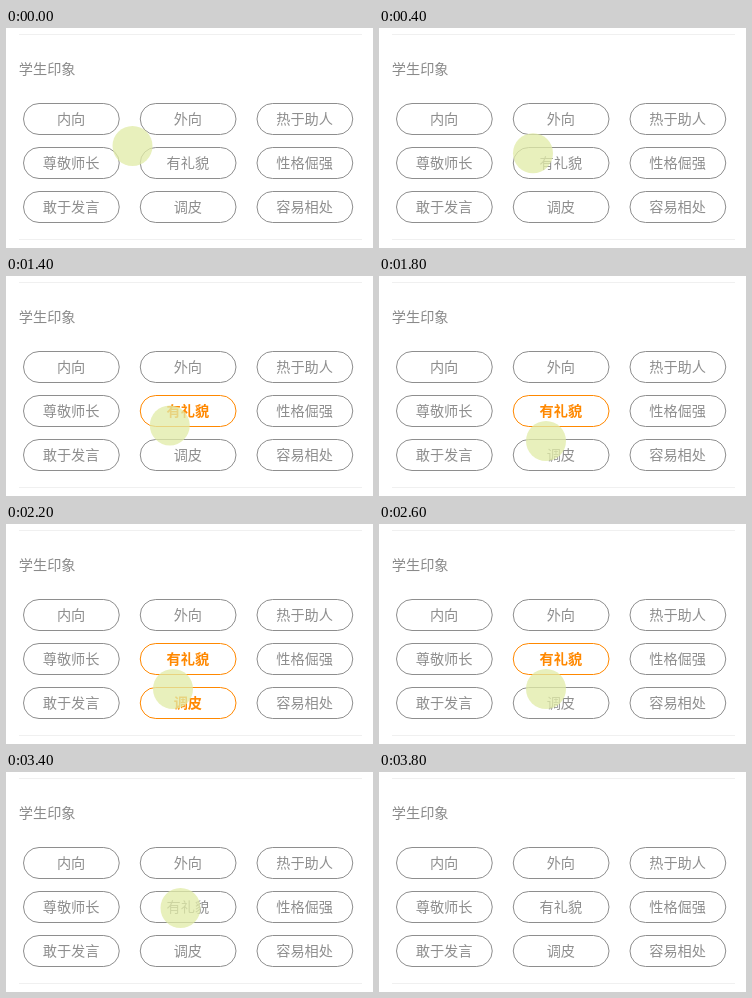
Animation, 367 px wide and 220 px high, one loop 4800 ms. Source, as an HTML page with a canvas:

```html
<!DOCTYPE html>
<html lang="zh-CN">
<head>
<meta charset="utf-8">
<title>学生印象</title>
<style>
html, body { margin: 0; width: 100%; height: 100%; overflow: hidden; background: #fff; }
canvas { display: block; width: 367px; height: 220px; }
</style>
</head>
<body>
<canvas id="stage"></canvas>
<script>
const W = 367, H = 220, LOOP = 4800, STEP = 200;
const canvas = document.getElementById('stage');
const ctx = canvas.getContext('2d');
const ratio = window.devicePixelRatio || 1;
canvas.width = W * ratio;
canvas.height = H * ratio;
ctx.scale(ratio, ratio);

const FONT = '"Noto Sans CJK SC", "Noto Sans CJK", sans-serif';
const GREY = '#8e8e8e', ORANGE = '#ff8800';
const TAGS = [
  '内向', '外向', '热于助人',
  '尊敬师长', '有礼貌', '性格倔强',
  '敢于发言', '调皮', '容易相处'
];
const GRID = { x: 17, y: 75, dx: 116.75, dy: 44, w: 96.75, h: 32 };

const linear = p => p;
const easeOut = p => 1 - (1 - p) ** 3;

const HOME = { x: 126.5, y: 118 };
const MOVES = [
  { from: 0, to: 200, x: 119, y: 120, ease: linear },
  { from: 200, to: 600, x: 159, y: 126, ease: easeOut },
  { from: 800, to: 1800, x: 167, y: 165, ease: linear },
  { from: 2600, to: 3000, x: 174.5, y: 136, ease: linear },
  { from: 3400, to: 3600, x: 175, y: 127.5, ease: linear }
];
const TAPS = [800, 2200, 2600, 3400];
const POINTER_END = 3800;

function pointerAt(t) {
  let { x, y } = HOME;
  for (const m of MOVES) {
    const p = m.ease(Math.min(1, Math.max(0, (t - m.from) / (m.to - m.from))));
    x += (m.x - x) * p;
    y += (m.y - y) * p;
  }
  return { x, y };
}

function tagUnder({ x, y }) {
  const col = Math.floor((x - GRID.x) / GRID.dx);
  const row = Math.floor((y - GRID.y) / GRID.dy);
  return row * 3 + col;
}

// Each tap toggles the tag below the pointer
function isSelected(i, t) {
  const hits = TAPS.filter(tap => tap <= t && tagUnder(pointerAt(tap)) === i);
  return hits.length % 2 === 1;
}

function label(text, x, y, color, align, weight = 400) {
  ctx.font = `${weight} 14.2px ${FONT}`;
  ctx.fillStyle = color;
  ctx.textAlign = align;
  ctx.textBaseline = 'alphabetic';
  ctx.fillText(text, x, y);
}

function drawTag(i, t) {
  const x = GRID.x + (i % 3) * GRID.dx;
  const y = GRID.y + Math.floor(i / 3) * GRID.dy;
  const on = isSelected(i, t);
  const color = on ? ORANGE : GREY;
  ctx.beginPath();
  ctx.roundRect(x + 0.5, y + 0.5, GRID.w - 1, GRID.h - 1, (GRID.h - 1) / 2);
  ctx.strokeStyle = color;
  ctx.lineWidth = 1;
  ctx.stroke();
  label(TAGS[i], x + 48.1, y + 21, color, 'center', on ? 700 : 400);
}

function drawPointer(t) {
  if (t >= POINTER_END) return;
  const { x, y } = pointerAt(t);
  ctx.beginPath();
  ctx.arc(x, y, 20, 0, Math.PI * 2);
  ctx.fillStyle = 'rgba(225, 236, 167, 0.76)';
  ctx.fill();
}

function draw(t) {
  ctx.fillStyle = '#fff';
  ctx.fillRect(0, 0, W, H);
  ctx.fillStyle = '#f0f0f0';
  ctx.fillRect(13, 6, 343, 1);
  ctx.fillRect(13, 211, 343, 1);
  label('学生印象', 12.8, 46, '#8a8a8a', 'left');
  TAGS.forEach((_, i) => drawTag(i, t));
  drawPointer(t);
}

const start = performance.now();
function tick() {
  const t = (performance.now() - start) % LOOP;
  draw(Math.floor(t / STEP) * STEP);
  requestAnimationFrame(tick);
}
tick();
</script>
</body>
</html>
```
